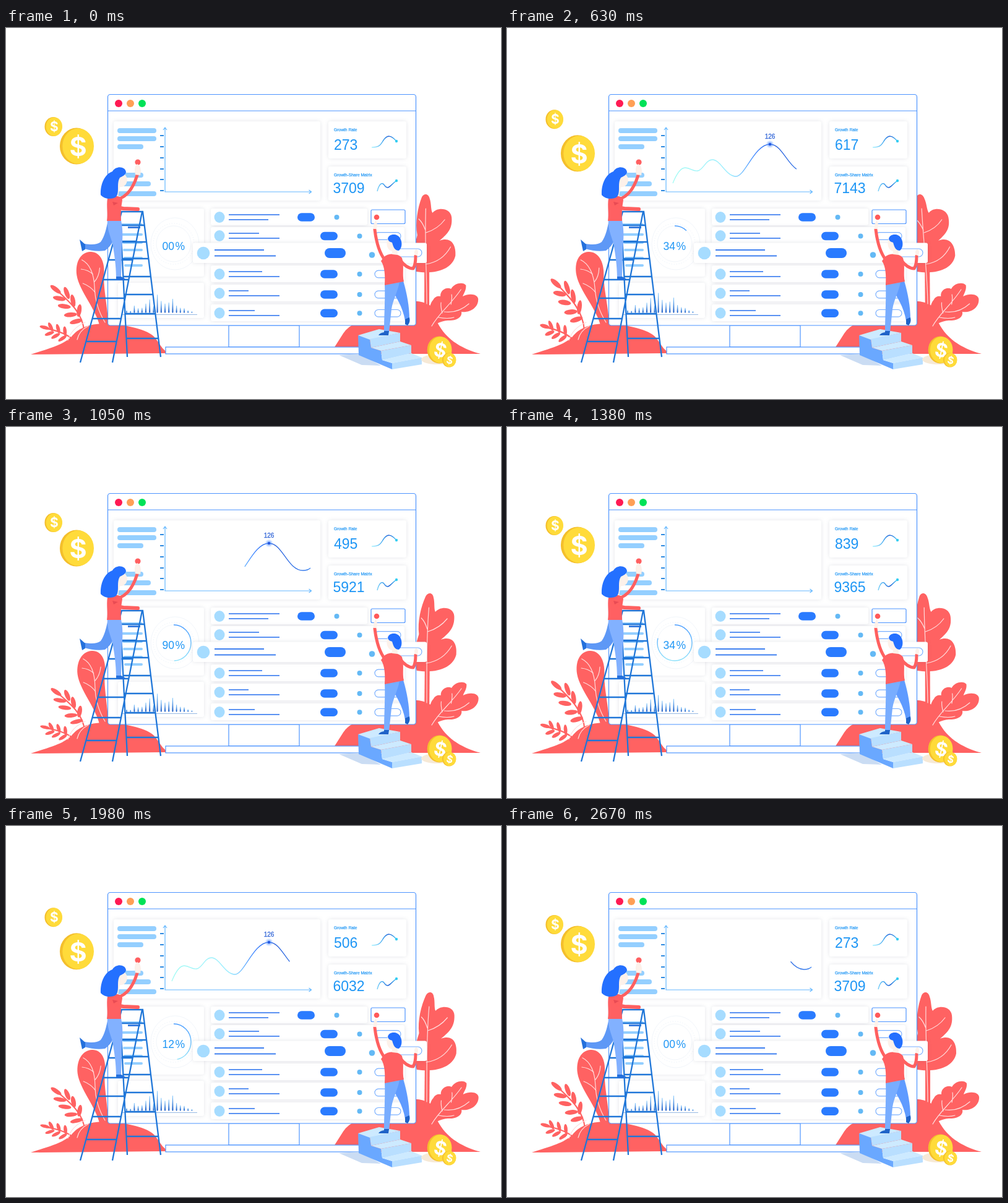
Recreate the animation shown at these times as an HTML page. Size 800 px wide and 600 px high, loop 2700 ms.

```html
<!DOCTYPE html>
<html lang="en">
<head>
<meta charset="utf-8">
<title>Dashboard</title>
<style>
  html, body { margin: 0; width: 100%; height: 100%; overflow: hidden; background: #fff; }
  svg { display: block; width: 800px; height: 600px; font-family: "Liberation Sans", Arial, sans-serif; }
  .line { fill: none; stroke: #4d94ff; stroke-width: 1.2; }
  .card { fill: #fff; filter: drop-shadow(0 0 3px rgba(60, 70, 100, .14)); }
  .red { fill: #ff6262; }
  .vein { fill: none; stroke: #ffdcdc; stroke-width: 1.2; stroke-linecap: round; }
  .bar { fill: #94cfff; }
  .num { font-size: 23px; fill: #1e96f5; }
  .tag { font-size: 6.7px; fill: #1e96f5; stroke: #1e96f5; stroke-width: .2; }
  .skin { fill: #fdf1ea; }
  .ladder { fill: none; stroke: #1f76d8; stroke-width: 2.3; }
  .arm { fill: none; stroke: #ff6060; stroke-linecap: round; stroke-linejoin: round; }
  .coin text { fill: #fff; font-family: Inter, Roboto, sans-serif; font-weight: bold; text-anchor: middle; }
</style>
</head>
<body>
<svg viewBox="0 0 800 600">
  <defs>
    <linearGradient id="curveInk" gradientUnits="userSpaceOnUse" x1="268" y1="0" x2="492" y2="0">
      <stop offset="0" stop-color="#a4fbf4"/><stop offset=".42" stop-color="#98ecff"/>
      <stop offset=".6" stop-color="#3f84ff"/><stop offset=".75" stop-color="#2a62dc"/>
      <stop offset="1" stop-color="#3b82f0"/>
    </linearGradient>
    <linearGradient id="miniInk" gradientUnits="userSpaceOnUse" x1="591" y1="0" x2="631" y2="0">
      <stop offset="0" stop-color="#a8f4ff"/><stop offset=".45" stop-color="#46a8f0"/>
      <stop offset=".7" stop-color="#1f5fd6"/><stop offset="1" stop-color="#3fc6f5"/>
    </linearGradient>
    <linearGradient id="arcInk" gradientUnits="userSpaceOnUse" x1="0" y1="320" x2="0" y2="378">
      <stop offset="0" stop-color="#4a9dff"/><stop offset="1" stop-color="#8fe2fb"/>
    </linearGradient>
    <linearGradient id="barInk" x1="0" y1="0" x2="0" y2="1">
      <stop offset="0" stop-color="#8fd0ff"/><stop offset="1" stop-color="#1757c4"/>
    </linearGradient>
  </defs>

  <!-- plants -->
  <path class="red" d="M40,528 C70,518 92,513 106,499 C116,486 134,477 165,478 C195,480 230,488 240,500 C250,512 253,523 266,526 Z"/>
  <path class="red" d="M531,516 L545,494 Q553,482 566,478 L655,474 V442 Q672,440 688,450 C696,486 718,514 767,527 L560,527 Z"/>
  <g id="ferns"></g>
  <path class="vein" d="M128,476 C114,482 104,492 100,505 M133,482 C123,487 117,495 115,504"/>
  <g id="plants"></g>

  <!-- monitor -->
  <rect class="line" x="360" y="481" width="114" height="35" style="fill:#fff"/>
  <rect class="line" x="258" y="516" width="330" height="11" style="fill:#fff"/>
  <rect class="line" x="164.500" y="107.500" width="498" height="373.500" rx="4" style="fill:#fff"/>
  <path class="line" d="M164,134 H663"/>
  <circle cx="182" cy="122" r="6" fill="#ff1a53"/>
  <circle cx="201" cy="122" r="6" fill="#ff9f55"/>
  <circle cx="220" cy="122" r="6" fill="#00e257"/>
  <g id="cards"></g>

  <!-- chart -->
  <g id="labels"></g>
  <path d="M257,162 V265 H493 M254,165 L257,161 L260,165 M489.500,262 L493.500,265 L489.500,268" fill="none" stroke="#64b8ff" stroke-width="1.200"/>
  <path d="M249,174 h6 m-6,18 h6 m-6,18 h6 m-6,18 h6 m-6,17 h6 m-6,18 h6" stroke="#2f8be0" stroke-width="2"/>
  <path id="curve" pathLength="1" fill="none" stroke="url(#curveInk)" stroke-width="1.300"
    d="M268,251 C274,236 280,226 288,226 C296,226 300,232 308,231 C317,230 321,213 332,213 C345,213 354,240 370,240 C385,240 400,188 425,188 C447,188 455,232 480,232 C486,232 490,230 492,228"/>
  <g id="peak">
    <circle cx="425" cy="188" r="6" fill="#4a8cff" opacity=".2"/>
    <circle cx="425" cy="188" r="4" fill="#4a8cff" opacity=".35"/>
    <circle cx="425" cy="188" r="2.200" fill="#2458e0"/>
    <text x="425" y="179" text-anchor="middle" font-size="10" fill="#3568d8" stroke="#3568d8" stroke-width=".3">126</text>
  </g>

  <!-- figures -->
  <text class="tag" x="530" y="166.500">Growth Rate</text>
  <text class="num" id="rate" x="530" y="197"></text>
  <path d="M591,193 C602,193 605,190 609,183 C616,172 622,173 631,183" fill="none" stroke="url(#miniInk)" stroke-width="1.500"/>
  <circle cx="631" cy="183" r="2.200" fill="#35cdf2"/>
  <text class="tag" x="530" y="239.500">Growth-Share Matrix</text>
  <text class="num" id="share" x="528.500" y="267"></text>
  <path d="M600,264 C603,252 608,248 612,255 C618,263 622,253 631,247" fill="none" stroke="url(#miniInk)" stroke-width="1.500"/>
  <circle cx="631" cy="247" r="2.200" fill="#35cdf2"/>

  <!-- gauge -->
  <ellipse cx="273" cy="349" rx="39" ry="42" fill="none" stroke="#f2f6fb"/>
  <circle cx="271" cy="349" r="33" fill="none" stroke="#e6effa" stroke-dasharray="1 3"/>
  <ellipse cx="271" cy="349" rx="28" ry="29" fill="none" stroke="#f2f6fb"/>
  <path id="arc" pathLength="1" d="M271,320 A28,29 0 0 1 271,378 A28,29 0 0 1 271,320" fill="none" stroke="url(#arcInk)" stroke-width="1.400"/>
  <g font-size="17.500" fill="#1e96f5">
    <text id="percent" x="252.500" y="359"></text><text x="273.500" y="358.500">%</text>
  </g>
  <path d="M186,463.500 H309" stroke="#7da7dc" stroke-width=".8"/>
  <g id="bars" fill="url(#barInk)"></g>

  <g id="rows"></g>
  <rect class="line" x="590" y="294" width="55" height="22.500" rx="2"/>
  <circle cx="599" cy="306" r="4.300" fill="#ff5a5a"/>
  <g id="pop"></g>

  <!-- woman and ladder -->
  <path class="ladder" id="ladder"/>
  <circle cx="213" cy="217" r="4.600" fill="#ff5f60"/>
  <g id="reach">
    <path class="arm" d="M184,276 Q203,268 212,238" stroke-width="5"/>
    <path class="skin" d="M209,237 Q207,225 212,220 Q219,224 217,238 Z" stroke="#f5e4dc" stroke-width=".5"/>
  </g>
  <path d="M165,311 L184,312 C180,334 172,352 160,360 C148,362 138,360 126,357 L127,349 C140,351 148,350 153,346 C160,336 162,324 165,311 Z" fill="#5e98f6"/>
  <path d="M119,342 L128,350 L128,358 L123,361 Z" fill="#2470dc"/>
  <path d="M164,311 L186,311 C190,330 188,345 187,360 L186,403 L178,403 C178,385 175,365 172,348 C168,335 163,324 164,311 Z" fill="#82b1ff"/>
  <path d="M178,402 H186 L193,406 L191,408 H178 Z" fill="#2470dc"/>
  <path d="M164,276 C172,270 186,270 188,278 C186,290 185,300 186,312 L163,312 C165,300 162,288 164,276 Z" fill="#ff6062"/>
  <path class="arm" d="M169,278 Q175,291 190,292 L213,293" stroke-width="6"/>
  <path d="M172,281 l9,2 -7,4 z" fill="#e94b54"/>
  <path class="skin" d="M183,232 C193,234 198,243 195,250 C193,256 187,258 184,257 L181,272 L174,270 Z"/>
  <path d="M194,233 C193,224 178,222 172,232 C160,236 152,252 153,270 C160,278 173,277 178,273 C184,265 178,252 184,242 C188,240 193,238 194,233 Z" fill="#2470ff"/>

  <!-- stairs -->
  <path d="M538,529 L572,527 L606,546 L575,545 Z" fill="#cadcf3"/>
  <path d="M569,497 L588,503 L590,517 L606,522 L608,537 L624,542 V552 L570,529 Z" fill="#6aa8ff"/>
  <path d="M569,497 L603,487 L637,493 L588,504 Z M590,517 L637,507 L655,513 L606,522 Z M608,537 L655,526 L672,533 L624,542 Z" fill="#cdeaff"/>
  <path d="M588,503 L637,493 V507 L590,517 Z M606,522 L655,513 V526 L608,537 Z M624,542 L672,533 V544 L624,552 Z" fill="#b9dfff"/>

  <!-- man -->
  <path d="M622,411 L642,409 C648,430 652,450 652,471 L645,473 C641,450 630,435 624,424 Z" fill="#5f9bff"/>
  <path d="M645,471 L652,468 Q654,476 649,481 L645,479 Z" fill="#1f63c8"/>
  <path d="M612,413 L636,411 C632,430 625,440 623,455 L619,492 L611,492 C611,465 613,440 612,413 Z" fill="#78adff"/>
  <path d="M611,490 H619 L618,497 H602 Q604,493 611,492 Z" fill="#1f63c8"/>
  <g id="press">
    <path class="arm" d="M613,376 Q600,360 596,326" stroke-width="5"/>
    <path class="skin" d="M593.500,325 Q594,314 598,311 Q601,317 599,325 Z"/>
  </g>
  <g id="hold">
    <path class="arm" d="M636,374 Q647,389 658,389 Q662,383 662,369" stroke-width="5"/>
    <ellipse class="skin" cx="663" cy="363" rx="3" ry="5"/>
  </g>
  <path d="M610,371 C618,363 634,364 640,372 C644,385 640,398 643,410 L612,416 C613,400 612,385 606,377 Z" fill="#ff6062"/>
  <path class="skin" d="M617,341 C613,350 617,360 624,361 V366 L633,367 L632,350 Z"/>
  <path d="M617,341 C618,333 632,331 637,340 C641,347 640,356 635,360 C628,360 626,354 624,347 C621,346 618,345 617,341 Z" fill="#2470ff"/>

  <ellipse cx="697" cy="536" rx="26" ry="8" fill="#f6e9d6"/>
  <g id="coins"></g>
</svg>
<script>
const $ = id => document.getElementById(id);
const LOOP = 2700, STEP = 30, TAU = Math.PI * 2;

const box = (x, y, x2, y2, attrs) => `<rect x="${x}" y="${y}" width="${x2 - x}" height="${y2 - y}" ${attrs}/>`;
const card = (...b) => box(...b, 'rx="3" class="card"');
const pill = (x, y, x2, y2) => box(x, y, x2, y2, `rx="${(y2 - y) / 2}" fill="#2a7bff"`);
const ring = (x, y, x2, y2) => box(x, y, x2, y2, `rx="${(y2 - y) / 2}" class="line" stroke-opacity=".75"`);

$('cards').innerHTML = [
  [174, 151, 508, 279], [521, 151, 647, 211], [521, 224, 647, 279],
  [181, 292, 320, 402], [181, 412, 320, 469]
].map(b => card(...b)).join('');

const label = (y, x2, h = 8, x = 180) => box(x, y, x2, y + h, `rx="${h / 2}" class="bar"`);
$('labels').innerHTML =
  [[162, 243], [175, 243], [188, 222], [234, 222], [248, 234], [264, 243]].map(a => label(...a)).join('') +
  [316, 332, 345, 357, 370, 382].map((y, i) => label(y, 221, 4, 186 + i)).join('') +
  box(197, 321, 217, 324, 'fill="#3d7fe0"');

// Each row: centre, ends of its two lines, pill x and centre
const row = (y, a, b, x, mid) => card(331, y - 14, x < 500 ? 584 : 644, y + 13) +
  `<ellipse cx="345" cy="${y}" rx="8.500" ry="9" fill="#a6dcff"/>
   <path d="M360,${y - 4} H${a} M360,${y + 4} H${b}" stroke="#5b92f2" stroke-width="1.900"/>
   <circle cx="${x + 63.5}" cy="${mid}" r="4" fill="#64b9f5"/>` +
  pill(x, mid - 6.8, x + 28, mid + 6.8) + (x > 500 ? ring(596, mid - 5.8, 638, mid + 5.8) : '');
$('rows').innerHTML = [
  [306, 442, 424, 471, 306], [336, 409, 442, 508, 336.5], [398, 414, 442, 508, 398],
  [429, 392, 442, 508, 431], [461, 402, 442, 508, 461.3]
].map(r => row(...r)).join('');
$('pop').innerHTML = card(302, 347.5, 680, 380) +
  `<circle cx="319" cy="364" r="10.300" fill="#a6dcff"/>
   <path d="M337,359 H417 M337,368.500 H436" stroke="#3f80f0" stroke-width="2.200"/>
   <circle cx="591.500" cy="367" r="4.800" fill="#64b9f5"/>` +
  pill(515, 356, 549, 372) + ring(630, 357, 672, 370);

const rungs = (ys, left, right) => ys.map(y => `M${left(y)},${y} H${right(y)}`).join('');
$('ladder').setAttribute('d', 'M183,297 H222 M187,297 L120,541 M220,297 L172,541 M184,297 L196,532 M221,297 L250,532' +
  rungs([345, 375, 407, 437, 470, 507], y => 187 - (y - 297) * .275, y => 220 - (y - 297) * .197) +
  rungs([319, 346, 373, 402, 431, 462, 502], y => 184 + (y - 297) * .051, y => 221 + (y - 297) * .123));

const coin = (id, x, y, rx, ry, size, tilt = 0) => `<g class="coin" id="${id}">
  <ellipse cx="${x - rx * .04}" cy="${y}" rx="${rx}" ry="${ry}" fill="#f4bf2c"/>
  <ellipse cx="${x + rx * .06}" cy="${y}" rx="${rx * .94}" ry="${ry * .97}" fill="#ffdb3a"/>
  <text x="${x + rx * .06}" y="${y + size * .365}" font-size="${size}" transform="rotate(${tilt} ${x} ${y})">$</text></g>`;
$('coins').innerHTML = coin('coinA', 115, 191, 27, 29.5, 43) + coin('coinB', 77, 159.5, 14, 15.5, 21) +
  coin('coinC', 701, 520.5, 19.5, 22, 31, 12) + coin('coinD', 716.5, 537, 11, 11.5, 16, 12);

// Ferns: stem plus leaflets as [x, y, angle]
const fern = (stem, leaves, len) => `<path d="${stem}" fill="none" stroke="#ff6262" stroke-width="2.200"/>` +
  leaves.map(([x, y, a]) => `<ellipse class="red" rx="${len}" ry="${len * .36}" transform="translate(${x} ${y}) rotate(${a})"/>`).join('');
$('ferns').innerHTML =
  fern('M126,490 C124,462 106,444 78,419', [[80, 421, 38], [86, 436, 10], [98, 427, 70], [94, 449, 8], [108, 440, 80], [104, 463, -5], [118, 456, 98], [113, 474, -15]], 10.5) +
  fern('M112,508 C102,496 86,489 60,485', [[62, 484, 15], [70, 494, -20], [72, 483, 65], [80, 498, -30], [84, 486, 75], [91, 502, -35], [95, 490, 85]], 8);

// Plants bend sideways, more towards the tip
const plants = [
  { base: 445, tip: 270, sway: 9, parts: [
    ['red', 'M676,394 L676,478 L684,478 L684,394 Z'],
    ['red', 'M663,394 C655,360 662,345 664,335 C660,315 664,290 670,274 C673,267 681,267 683,276 C686,284 685,294 688,299 C696,289 717,291 719,306 C721,324 714,332 700,344 C718,337 727,350 726,368 C722,388 698,399 663,394 Z'],
    ['vein', 'M680,446 C680,400 676,350 677,292 M678,331 Q697,325 708,310 M677,327 Q672,314 666,309 M678,382 Q705,378 718,354 M678,378 Q672,366 664,360']] },
  { base: 480, tip: 363, sway: 3.6, parts: [
    ['red', 'M152,484 C146,455 118,425 114,400 C111,378 120,363 135,362 C150,361 160,376 158,400 C157,420 164,450 166,484 Z'],
    ['vein', 'M122,375 C138,383 142,402 143,420 Q144,450 160,476 M140,398 Q132,391 121,390 M143,410 Q150,402 151,388 M144,428 Q137,418 124,413']] },
  { base: 485, tip: 412, sway: 1.5, parts: [
    ['red', 'M684,486 C682,462 684,446 690,440 C693,434 698,433 702,434 C701,424 712,418 719,422 C724,412 739,410 743,416 C744,424 739,430 738,434 C750,428 762,431 763,438 C764,452 750,461 736,459 C738,468 727,474 714,473 C702,474 692,479 688,486 Z'],
    ['vein', 'M688,482 C700,461 718,448 735,423 M705,461 Q702,450 703,444 M719,447 Q721,438 720,431 M708,459 Q730,462 748,446 M699,468 Q714,471 724,468']] }
];
for (const p of plants) {
  p.nodes = p.parts.map(([cls]) => {
    const node = document.createElementNS('http://www.w3.org/2000/svg', 'path');
    node.setAttribute('class', cls);
    $('plants').append(node);
    return node;
  });
}
const bend = (d, { base, tip, sway }, s) => d.replace(/([\d.]+),([\d.]+)/g, (_, x, y) => {
  const k = Math.max(0, (base - y) / (base - tip));
  return `${(+x + s * sway * k * k).toFixed(2)},${y}`;
});

const barHeights = [5, 4, 14, 9, 10, 18, 26, 13, 35, 23, 18, 20, 27, 14, 10, 9, 5, 3];
const drawBars = scale => $('bars').innerHTML = barHeights.map((h, i) => {
  const x = 195 + i * 6.2, top = 461 - h * scale;
  return `<path d="M${x - .5},${top} h1 L${x + 1.1},459 Q${x},463 ${x - 1.1},459 Z"/>`;
}).join('');

// Counters roll through [time, steps] keys
const rateKeys = [[0, 0], [360, 5], [630, 14], [1050, 22], [1710, 31], [2280, 36], [2670, 40], [2700, 40]];
const percentKeys = [[0, 0], [360, 7], [630, 13], [1050, 19], [1710, 28], [2280, 35], [2670, 40], [2700, 40]];
const stepAt = (keys, t) => {
  const i = keys.findIndex(k => t < k[0]);
  const [t0, a] = keys[i - 1], [t1, b] = keys[i];
  return Math.floor(a + (b - a) * (t - t0) / (t1 - t0) + 1e-6);
};
const roll = (digits, k) => [...digits].map(d => (+d + k) % 10).join('');
const trim = (id, from, to) => {
  const { style } = $(id);
  style.strokeDasharray = `${to - from} 2`;
  style.strokeDashoffset = -from;
  style.visibility = to - from > .001 ? 'visible' : 'hidden';
};
const shift = (id, y) => $(id).setAttribute('transform', `translate(0 ${y.toFixed(2)})`);

function draw(t) {
  const sway = Math.sin(TAU * (t + 30) / 900);
  for (const p of plants) p.nodes.forEach((n, i) => n.setAttribute('d', bend(p.parts[i][1], p, sway)));
  $('ferns').setAttribute('transform', `translate(${sway} 500) scale(1 ${1 - .1 * sway}) translate(0 -500)`);

  const float = (1 - Math.cos(TAU * t / 1350)) / 2;
  shift('coinA', 12 * float);
  shift('coinB', -12 * float);

  const phase = t % 1380;
  trim('curve', Math.max(0, phase / 690 - 1), Math.min(1, phase / 690));
  $('peak').style.opacity = Math.max(0, Math.min(1, (phase - 480) / 60, (1200 - phase) / 60));
  trim('arc', 0, Math.max(0, .9 - Math.abs(t - 1500) * .0009));

  const push = phase > 100 && phase < 590 ? Math.sin(Math.PI * (phase - 100) / 490) ** 2 : 0;
  shift('pop', -5 * push);
  shift('hold', -4 * push);
  shift('press', -2.5 * push);
  shift('reach', -3 * push);

  drawBars(.95 + .2 * Math.cos(TAU * (t - 300) / 450));
  const k = stepAt(rateKeys, t), tens = stepAt(percentKeys, t) % 10;
  $('rate').textContent = roll('273', k);
  $('share').textContent = roll('3709', k);
  $('percent').textContent = `${tens}${tens ? (tens + 1) % 10 : 0}`;
}

const start = performance.now();
function tick() {
  const t = Math.max(0, performance.now() - start) % LOOP;
  draw(Math.floor(t / STEP) * STEP);
  requestAnimationFrame(tick);
}
tick();
</script>
</body>
</html>
```
